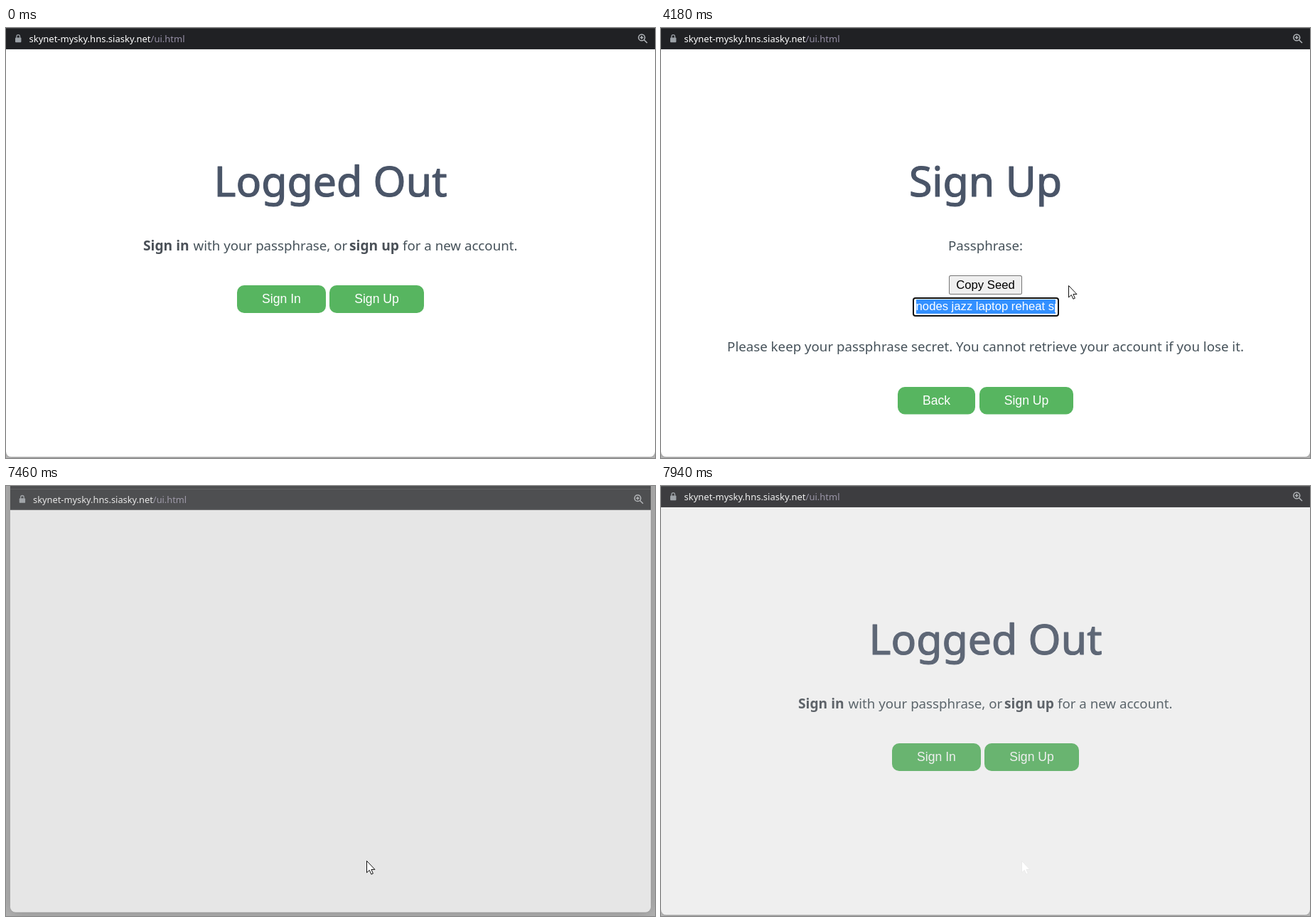
Animation of 913x605 px, one loop 8.01 s. Source, as an HTML page with a canvas:

```html
<!DOCTYPE html>
<html lang="en">
<head>
<meta charset="utf-8">
<title>Sign up flow</title>
<style>
html, body { margin: 0; width: 100%; height: 100%; overflow: hidden; background: #b2b2b2; }
canvas { display: block; width: 913px; height: 605px; }
</style>
</head>
<body>
<canvas id="stage" width="913" height="605"></canvas>
<script>
const W = 913, H = 605, LOOP = 8010, MID = 456.5;
const HUMANIST = '"Noto Sans", "Open Sans", sans-serif';
const GROTESK = '"Liberation Sans", Arial, sans-serif';
const BODY = `18.7px ${HUMANIST}`, STRONG = `bold 19.2px ${HUMANIST}`;
const BUTTON = `17.6px ${GROTESK}`, FIELD = `16.67px ${GROTESK}`;
const INK = '#46525a', SLATE = '#4a5568';
const GREEN = [87, 181, 96], HOVER = [88, 169, 95];

const stage = document.getElementById('stage').getContext('2d');
const layer = document.createElement('canvas');
layer.width = W;
layer.height = H;
const layerCtx = layer.getContext('2d');

// Pointer travel: start, last step, step count, points passed on the way
const START = [653, 594];
const MOVES = [
  [110, 860, 12, [[602, 520], [548, 432], [526, 402]]],
  [930, 1070, 3, [[525, 394], [523, 384]]],
  [1950, 2640, 10, [[535, 368], [460, 306], [375, 325], [455, 357]]],
  [2840, 2840, 1, [[436, 354]]],
  [3040, 3370, 4, [[437, 350], [450, 306]]],
  [3900, 4180, 5, [[500, 318], [573, 362]]],
  [4250, 4590, 5, [[657, 369]]],
  [4720, 4720, 1, [[646, 365]]],
  [4920, 5700, 12, [[650, 350], [610, 380], [566, 446]]],
  [5770, 5840, 2, [[443, 495]]],
  [6110, 6530, 6, [[470, 515], [503, 529]]],
  [6660, 6790, 3, [[507, 527]]]
];
const CLOSING = [[7390, 0.9, 0.997], [7460, 0.68, 0.987], [7530, 0.3, 0.975], [7600, 0, 0.96]];

function stepOf(t, start, end, count) {
  if (t < start) return -1;
  if (t >= end) return count - 1;
  return Math.floor((t - start) / (end - start) * (count - 1) + 0.01);
}

function along(pts, u) {
  const n = pts.length - 1;
  const i = Math.min(n - 1, Math.floor(u * n));
  const f = u * n - i;
  const at = k => pts[Math.max(0, Math.min(n, k))];
  return [0, 1].map(k => {
    const a = at(i - 1)[k], b = at(i)[k], c = at(i + 1)[k], d = at(i + 2)[k];
    return b + 0.5 * f * (c - a + f * (2 * a - 5 * b + 4 * c - d + f * (3 * (b - c) + d - a)));
  });
}

function pointerAt(t) {
  let from = START, pos = null;
  for (const [start, end, count, pts] of MOVES) {
    const step = stepOf(t, start, end, count);
    if (step < 0) break;
    pos = along([from, ...pts], (step + 1) / count);
    from = pts[pts.length - 1];
  }
  return pos;
}

const inside = (p, x, y, w, h) => p && p[0] >= x && p[0] <= x + w && p[1] >= y && p[1] <= y + h;

function pointerKind(t, p) {
  if (t < 1270) return inside(p, 455, 362, 133, 39) ? 'hand' : 'arrow';
  if (t >= 7190) return 'arrow';
  if (inside(p, 448, 505, 132, 38)) return 'hand';
  const overText = inside(p, 354, 379, 206, 27) || inside(p, 406, 294, 101, 25) || inside(p, 93, 436, 727, 25);
  return overText ? 'beam' : 'arrow';
}

function text(c, str, x, y, font, color, align = 'left') {
  c.font = font;
  c.fillStyle = color;
  c.textAlign = align;
  c.fillText(str, x, y);
}

function box(c, x, y, w, h, r, fill) {
  c.beginPath();
  c.roundRect(x, y, w, h, r);
  c.fillStyle = fill;
  c.fill();
}

function greenButton(c, label, x, y, w, h, hover = 0) {
  const rgb = GREEN.map((v, i) => Math.round(v + (HOVER[i] - v) * hover));
  box(c, x, y, w, h, 10, `rgb(${rgb})`);
  text(c, label, x + w / 2, y + 25, BUTTON, '#fff', 'center');
}

// Regular weight thickened by a thin outline gives the medium weight
function heading(c, str) {
  text(c, str, MID, 237, `59px ${HUMANIST}`, SLATE, 'center');
  c.strokeStyle = SLATE;
  c.lineWidth = 1.2;
  c.lineJoin = 'round';
  c.strokeText(str, MID, 237);
}

function frameOfWindow(c, floating) {
  c.save();
  if (floating) {
    c.shadowColor = 'rgba(0,0,0,0.3)';
    c.shadowBlur = 22;
  }
  box(c, 0, -40, W, 644.5, [0, 0, 8, 8], '#8c8c8c');
  c.restore();
  box(c, 0, -40, W, 643.6, [0, 0, 7.5, 7.5], '#fff');
  c.fillStyle = '#202124';
  c.fillRect(0, -40, W, 70);
  c.fillStyle = '#3b3c3f';
  c.fillRect(0, 0, W, 1);
  c.fillStyle = '#2b2c30';
  c.fillRect(0, 29, W, 1);

  // Padlock
  box(c, 13, 13.4, 8.4, 6.8, 1, '#9aa0a6');
  c.strokeStyle = '#9aa0a6';
  c.lineWidth = 1.3;
  c.beginPath();
  c.moveTo(14.9, 14);
  c.lineTo(14.9, 12);
  c.arc(17.2, 12, 2.3, Math.PI, 0);
  c.lineTo(19.5, 14);
  c.stroke();

  const host = 'skynet-mysky.hns.siasky.net';
  text(c, host, 32.5, 20, `500 13px ${HUMANIST}`, '#fff');
  text(c, '/ui.html', 32.5 + c.measureText(host).width, 20, `13px ${HUMANIST}`, '#958fa5');

  // Zoom icon
  c.strokeStyle = '#b4b8bc';
  c.lineWidth = 1.5;
  c.beginPath();
  c.arc(894.3, 13.4, 4.4, 0, 7);
  c.moveTo(897.6, 16.7);
  c.lineTo(902, 21);
  c.moveTo(892, 13.4);
  c.lineTo(896.6, 13.4);
  c.moveTo(894.3, 11.1);
  c.lineTo(894.3, 15.7);
  c.stroke();
}

function loggedOutPage(c, hover) {
  heading(c, 'Logged Out');
  text(c, 'Sign in', 193, 313, STRONG, '#4a5057');
  text(c, 'with your passphrase, or', 263.5, 313, BODY, INK);
  text(c, 'sign up', 483, 313, STRONG, '#4a5057');
  text(c, 'for a new account.', 558, 313, BODY, INK);
  greenButton(c, 'Sign In', 325, 362, 125, 39);
  greenButton(c, 'Sign Up', 455, 362, 133, 39, hover);
}

function seedField(c, selected) {
  if (selected) {
    box(c, 354, 379, 206, 27, 4, '#101010');
    box(c, 356, 381, 202, 23, 2, '#fff');
    c.fillStyle = '#3390ff';
    c.fillRect(359, 382, 196, 20);
  } else {
    c.fillStyle = '#767676';
    c.fillRect(354, 379, 206, 27);
    c.fillStyle = '#26262b';
    c.beginPath();
    c.moveTo(354, 406);
    c.lineTo(354, 379);
    c.lineTo(560, 379);
    c.lineTo(558, 381);
    c.lineTo(356, 381);
    c.lineTo(356, 404);
    c.fill();
    c.fillStyle = '#fff';
    c.fillRect(356, 381, 202, 23);
  }
  c.save();
  c.beginPath();
  c.rect(358, 381, 197, 23);
  c.clip();
  text(c, 'nodes jazz laptop reheat sp', 358.6, 397, FIELD, selected ? '#fff' : '#d2cec8');
  c.restore();
}

function signUpPage(c, selected, pressed, hover) {
  heading(c, 'Sign Up');
  text(c, 'Passphrase:', MID, 313, BODY, INK, 'center');
  box(c, 405, 348, 103, 27, 2.5, '#767676');
  box(c, 406, 349, 101, 25, 1.5, pressed ? '#f5f5f5' : '#efefef');
  text(c, 'Copy Seed', MID, 367, FIELD, '#000', 'center');
  seedField(c, selected);
  text(c, 'Please keep your passphrase secret. You cannot retrieve your account if you lose it.',
    MID, 455, BODY, INK, 'center');
  greenButton(c, 'Back', 333, 505, 109, 38.4);
  greenButton(c, 'Sign Up', 448, 505, 132, 38.4, hover);
}

const ARROW = new Path2D('M.5 .5V17L4.3 13.5L6.9 19.3L9.4 18.2L6.9 12.6H12Z');
const HAND = new Path2D('M-2 12V1Q-2-1 0-1Q2-1 2 1V6.5Q4.6 5.4 5 7.8Q7.2 6.8 7.7 9Q10 8.4 10 11V15' +
  'Q9.8 18 7.8 19.5V22H-1.5V20L-6 14Q-7.6 11.5-5.5 10.6Q-4 10.3-2 13Z');
const KNUCKLES = new Path2D('M2 6.5V11M5 8V11.5M7.7 9.2V12');
const BEAM = new Path2D('M-3.5-7.5H-1Q.5-7.5 .5-6Q.5-7.5 2-7.5H4.5M.5-6V6M-3.5 7.5H-1Q.5 7.5 .5 6Q.5 7.5 2 7.5H4.5');

function drawPointer(c, kind, [x, y], outline) {
  c.save();
  c.translate(Math.round(x), Math.round(y));
  c.strokeStyle = outline;
  c.lineWidth = 1;
  c.lineJoin = 'round';
  if (kind === 'beam') {
    c.stroke(BEAM);
  } else {
    const shape = kind === 'hand' ? HAND : ARROW;
    c.fillStyle = '#fff';
    c.fill(shape);
    c.stroke(shape);
    if (kind === 'hand') c.stroke(KNUCKLES);
  }
  c.restore();
}

function drawWindow(c, t, p, floating) {
  frameOfWindow(c, floating);
  if (t < 1270) {
    loggedOutPage(c, (stepOf(t, 930, 1070, 3) + 1) / 3);
  } else if (t < 7060) {
    const hover = inside(p, 448, 505, 132, 38) ? 1 : 0;
    signUpPage(c, t >= 3110 && t < 4590, t >= 3040 && t < 3110, hover);
  }
}

// Paints a picture on the spare canvas, then blends it in
function blend(alpha, scale, paint) {
  layerCtx.setTransform(1, 0, 0, 1, 0, 0);
  layerCtx.clearRect(0, 0, W, H);
  layerCtx.setTransform(scale, 0, 0, scale, W / 2 * (1 - scale), H / 2 * (1 - scale));
  paint(layerCtx);
  stage.globalAlpha = alpha;
  stage.drawImage(layer, 0, 0);
  stage.globalAlpha = 1;
}

function scene(c, t) {
  const p = pointerAt(t);
  c.fillStyle = '#b2b2b2';
  c.fillRect(0, 0, W, H);
  if (t < 7390) {
    drawWindow(c, t, p, false);
  } else {
    const [, alpha, scale] = CLOSING.filter(k => t >= k[0]).pop();
    if (alpha) blend(alpha, scale, l => drawWindow(l, t, p, true));
  }
  if (p) drawPointer(c, pointerKind(t, p), p, t < 7600 ? '#111' : '#999');
}

function render(t) {
  if (t >= 1270 && t < 1470) {
    scene(stage, 1269);
    blend((stepOf(t, 1270, 1470, 4) + 1) / 4, 1, l => scene(l, 1470));
  } else {
    scene(stage, t);
    if (t >= 7730) blend((stepOf(t, 7730, 7940, 4) + 1) / 5, 1, l => scene(l, 0));
  }
}

const begin = performance.now();
function tick() {
  render((performance.now() - begin) % LOOP);
  requestAnimationFrame(tick);
}
tick();
</script>
</body>
</html>
```
